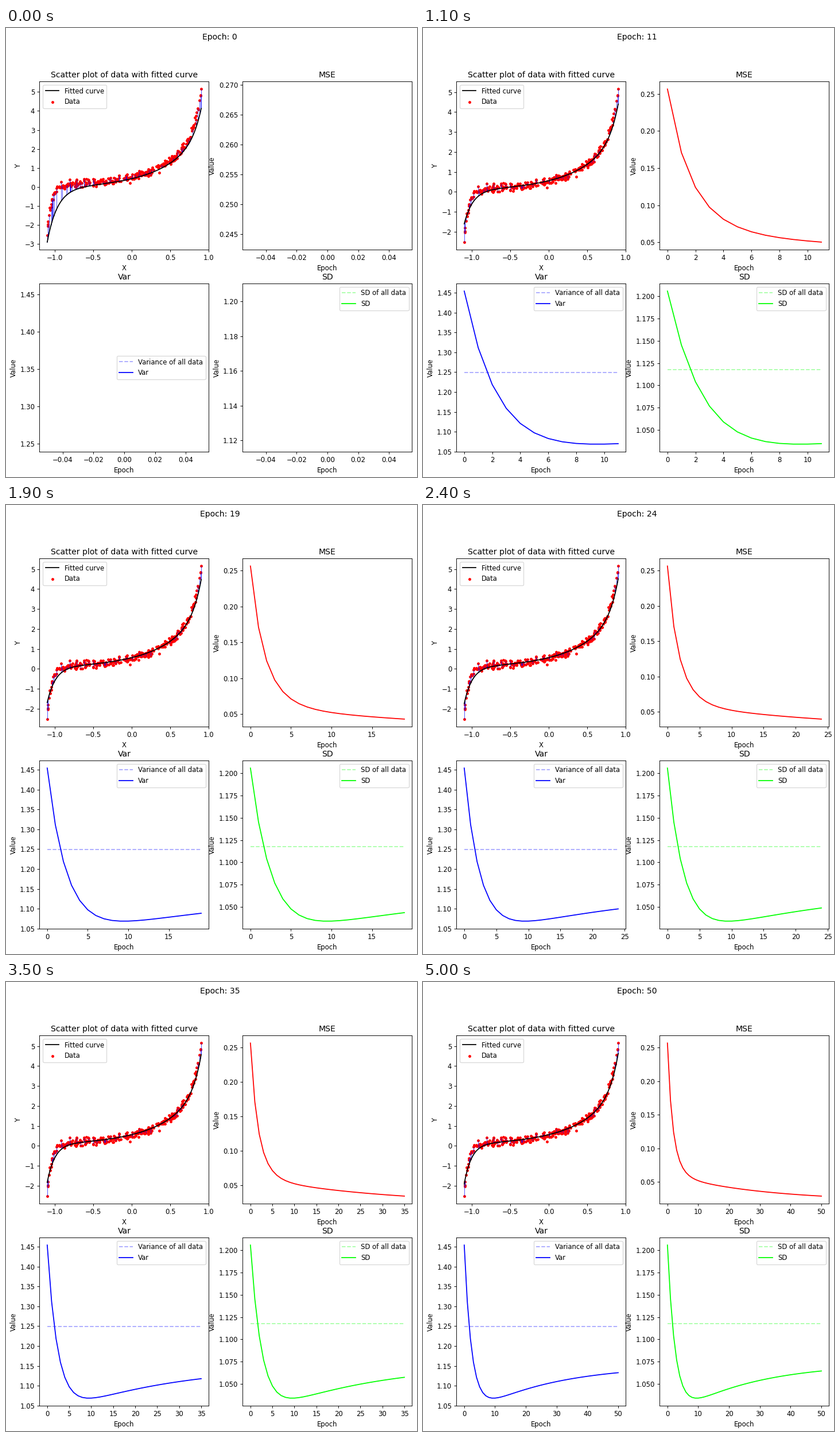
A matplotlib script that plays this animation: 716 px wide and 782 px high, repeating every 5100 ms.

```python
import numpy as np
import matplotlib.pyplot as plt
from matplotlib.animation import FuncAnimation

W, H, DPI = 716, 782, 84
EPOCHS = 51
POINTS, STEMS = 300, 100
X_MIN, X_MAX = -1.1, 0.9
Y_MIN, Y_MAX = -2.52, 5.15
VAR_ALL = 1.2495


def shape(x, floor, left, left_rate, right):
    """Gentle growth with a steep drop at the left end and a rise at the right."""
    return (floor + 0.52 * np.exp(1.85 * x)
            - left * np.exp(-left_rate * (x - X_MIN))
            + right * np.exp(9.5 * (x - X_MAX)))


def fit(x, epoch):
    """Fitted curve: a quick first correction, then a slow drift."""
    quick, slow = 0.68 ** epoch, np.exp(-epoch / 28)
    return shape(x,
                 floor=0.04 - 0.12 * quick,
                 left=2.13 - 0.65 * slow + 1.4 * quick,
                 left_rate=11.1 - 3.7 * slow,
                 right=1.91 - 0.45 * slow)


# Noisy data; the first two points are the extremes
rng = np.random.default_rng(7)
data_x = rng.uniform(X_MIN, X_MAX, POINTS)
data_y = shape(data_x, 0.04, 2.5, 18, 2.3) + rng.normal(0, 0.115, POINTS)
data_y = np.clip(data_y, Y_MIN + 0.1, Y_MAX - 0.1)
data_x[:2] = X_MIN, X_MAX
data_y[:2] = Y_MIN, Y_MAX
stem_x, stem_y = data_x[:STEMS], data_y[:STEMS]

# Metric histories
epochs = np.arange(EPOCHS)
quick = 0.66 ** epochs
mse = 0.0215 + 0.04 * np.exp(-epochs / 30) + 0.115 * quick + 0.08 * quick ** 2
var = 1.1521 - 0.1326 * np.exp(-epochs / 26) + 0.435 * quick

# The small excess keeps rounding from losing a pixel
fig = plt.figure(figsize=((W + 1e-4) / DPI, (H + 1e-4) / DPI), dpi=DPI)
heading = fig.text(372.5 / W, 1 - 20 / H, "", fontsize=12, ha="center")


def panel(col, row, title, xlabel="Epoch", ylabel="Value"):
    w, h = 295, 293.2
    left, bottom = 58.4 + 1.2 * w * col, H - 93 - h - 1.2 * h * row
    ax = fig.add_axes([left / W, bottom / H, w / W, h / H])
    ax.set(title=title, xlabel=xlabel, ylabel=ylabel)
    return ax


def history(ax, values, color, label=None, level=None, level_label=None):
    """Prepare a growing line, with an optional dashed reference level."""
    ref = None
    if level is not None:
        ref, = ax.plot([], [], "--", color=color, alpha=0.35,
                       label=level_label)
    line, = ax.plot([], [], color=color, label=label)
    if label:
        ax.legend(loc="best")

    def show(n):
        line.set_data(epochs[:n + 1], values[:n + 1])
        if ref is not None:
            ref.set_data(epochs[:n + 1], np.full(n + 1, level))
        ax.relim()
        ax.autoscale_view()

    return show


ax_fit = panel(0, 0, "Scatter plot of data with fitted curve", "X", "Y")
ax_fit.set_xlim(X_MIN - 0.1, X_MAX + 0.1)
grid = np.linspace(X_MIN, X_MAX, 300)
dots = ax_fit.scatter(data_x, data_y, s=10, color="red", label="Data")
stems = ax_fit.vlines(stem_x, 0, stem_y, color="blue", lw=0.8, alpha=0.7,
                      zorder=2)
curve, = ax_fit.plot(grid, grid, color="black", zorder=3,
                     label="Fitted curve")
ax_fit.legend(handles=[curve, dots], loc="upper left")

histories = [
    history(panel(1, 0, "MSE"), mse, "red"),
    history(panel(0, 1, "Var"), var, "blue", "Var",
            VAR_ALL, "Variance of all data"),
    history(panel(1, 1, "SD"), np.sqrt(var), "lime", "SD",
            np.sqrt(VAR_ALL), "SD of all data"),
]


def update(n):
    heading.set_text(f"Epoch: {n}")
    y = fit(grid, n)
    curve.set_ydata(y)
    stems.set_segments([[(x, a), (x, b)] for x, a, b
                        in zip(stem_x, stem_y, fit(stem_x, n))])
    low = min(Y_MIN, y.min())
    pad = 0.05 * (Y_MAX - low)
    ax_fit.set_ylim(low - pad, Y_MAX + pad)
    for show in histories:
        show(n)


anim = FuncAnimation(fig, update, frames=EPOCHS, interval=100, repeat=True)
plt.show()
```
